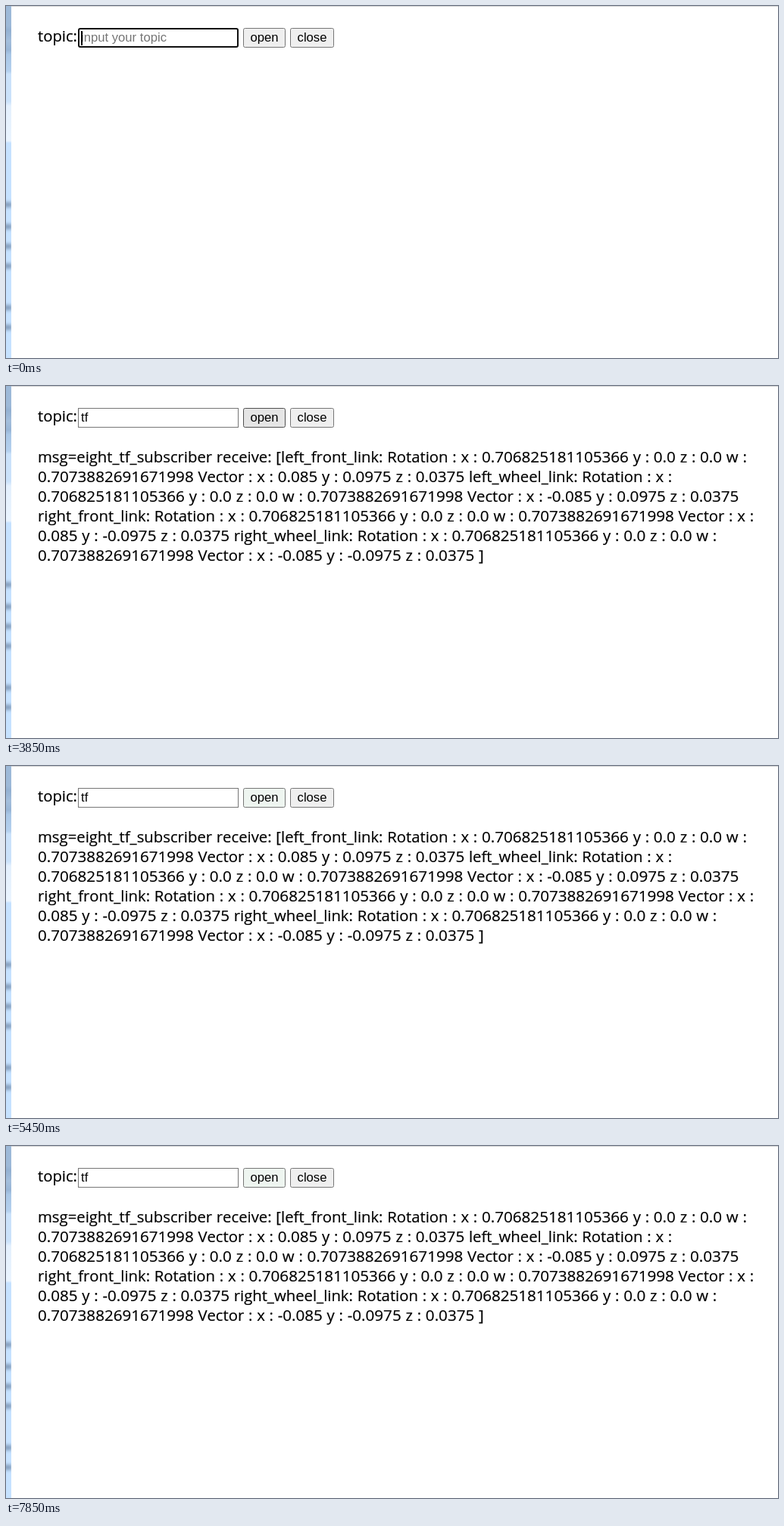
Animation, 1019 px wide and 465 px high, one loop 8 s. Source, as an HTML page:

```html
<!DOCTYPE html>
<html lang="en">
<head>
<meta charset="utf-8">
<title>Topic viewer</title>
<style>
  html, body { margin: 0; width: 100%; height: 100%; overflow: hidden; background: #fff; }
  svg { position: absolute; left: 0; top: 0; display: block; }
  .page { font: 20.3px "Open Sans", "Noto Sans", sans-serif; word-spacing: .5px; font-kerning: none;
    stroke: #000; stroke-width: .2px; }
  .number { font-size: 20.6px; }
  .control { font: 16.67px "Liberation Sans", Arial, sans-serif; }
  #strip { position: absolute; left: 0; top: 0; width: 7px; height: 465px; overflow: hidden;
    background: linear-gradient(#9db9d8 0 26px, #94b1d2 32px, #a3bedc 46px, #98b5d6 58px,
      #a9c7e6 64px, #b4d0ee 86px, #cbe2fa 90px 126px, #e4f0fd 132px, #eaf4fe 178px, #c6e2ff 181px); }
  #strip i { position: absolute; left: -4px; width: 12px; height: 7px; background: #859fbe; filter: blur(2.2px); }
</style>
</head>
<body>
<div id="strip"></div>
<svg width="1019" height="465" viewBox="0 0 1019 465">
  <rect x="7" width="1012" height="1" fill="#d6d6d6"/>
  <text class="page" x="42" y="47">topic:</text>
  <rect id="field" fill="#fff"/>
  <text id="value" class="control" x="99" y="47"></text>
  <rect id="caret" y="33" width="2" height="19"/>
  <rect id="open" x="313.5" y="29.5" width="55" height="25" rx="2"/>
  <text class="control" x="341" y="47" text-anchor="middle">open</text>
  <rect x="375.5" y="29.5" width="57" height="25" rx="2" fill="#efefef" stroke="#767676"/>
  <text class="control" x="404" y="47" text-anchor="middle">close</text>
  <g id="message" class="page"></g>
</svg>
<script>
const LOOP = 8000, MESSAGE_START = 3850, MESSAGE_STEP = 400, BLUR_AT = 3050;
const $ = id => document.getElementById(id);
const set = (el, attrs) => Object.entries(attrs).forEach(([k, v]) => el.setAttribute(k, v));
const svg = (tag, attrs) => {
  const el = document.createElementNS("http://www.w3.org/2000/svg", tag);
  set(el, attrs);
  return el;
};

const messages = [[
  "msg=eight_tf_subscriber receive: [left_front_link: Rotation : x : 0.706825181105366 y : 0.0 z : 0.0 w :",
  "0.7073882691671998 Vector : x : 0.085 y : 0.0975 z : 0.0375 left_wheel_link: Rotation : x :",
  "0.706825181105366 y : 0.0 z : 0.0 w : 0.7073882691671998 Vector : x : -0.085 y : 0.0975 z : 0.0375",
  "right_front_link: Rotation : x : 0.706825181105366 y : 0.0 z : 0.0 w : 0.7073882691671998 Vector : x :",
  "0.085 y : -0.0975 z : 0.0375 right_wheel_link: Rotation : x : 0.706825181105366 y : 0.0 z : 0.0 w :",
  "0.7073882691671998 Vector : x : -0.085 y : -0.0975 z : 0.0375 ]"
], [
  "msg=eight_tf_subscriber receive: [camera_color_frame: Rotation : x : 0.0 y : 0.0 z : 0.0 w : 1.0 Vector",
  ": x : 0.0 y : -0.0 z : -0.0 camera_color_frame: Rotation : x : 0.0 y : 0.0 z : 0.0 w : 1.0 Vector : x : 0.0 y :",
  "-0.0 z : -0.0 camera_color_optical_frame: Rotation : x : -0.5 y : 0.4999999999999999 z : -0.5 w :",
  "0.5000000000000001 Vector : x : 0.0 y : -0.0 z : -0.0 camera_depth_optical_frame: Rotation : x : -0.5",
  "y : 0.4999999999999999 z : -0.5 w : 0.5000000000000001 Vector : x : 0.0 y : -0.0 z : -0.0",
  "camera_depth_frame: Rotation : x : 0.0 y : 0.0 z : 0.0 w : 1.0 Vector : x : 0.0 y : -0.0 z : -0.0 ]"
]];

const buttonLooks = {
  idle: { fill: "#efefef", stroke: "#767676" },
  hover: { fill: "#e5e5e5", stroke: "#4f4f4f" },
  pressed: { fill: "#f5f5f5", stroke: "#8d8d8d" },
  left: { fill: "#eef5f0", stroke: "#767676" }
};
const buttonStates = [[0, "idle"], [1770, "hover"], [2080, "idle"], [2290, "hover"],
  [BLUR_AT, "pressed"], [3450, "hover"], [5450, "left"]];
const typed = [[0, ""], [830, "t"], [1030, "tf"]];
const caretStates = [[0, true], [290, false], [830, true], [1570, false], [2080, true], [2610, false]];
const caretX = [99, 103, 108];

const at = (steps, t) => steps.filter(([start]) => start <= t).pop()[1];

for (const y of [262, 291, 317, 343, 398, 424]) {
  const smudge = document.createElement("i");
  smudge.style.top = y - 3.5 + "px";
  $("strip").append(smudge);
}

// Numbers are set slightly larger than words.
function textLine(text, row) {
  const line = svg("text", { x: 42, y: 101 + 26 * row });
  for (const part of text.split(/(\d+\.\d+)/)) {
    if (!/^\d/.test(part)) { line.append(part); continue; }
    const number = svg("tspan", { class: "number" });
    number.textContent = part;
    line.append(number);
  }
  return line;
}

const groups = messages.map(rows => {
  const group = svg("g", { display: "none" });
  group.append(...rows.map(textLine));
  $("message").append(group);
  return group;
});

function draw() {
  const t = performance.now() % LOOP;
  const focused = t < BLUR_AT;
  const text = at(typed, t);
  set($("field"), focused
    ? { x: 96, y: 30, width: 210, height: 24, rx: 2, stroke: "#101010", "stroke-width": 2 }
    : { x: 95.5, y: 29.5, width: 211, height: 25, rx: 0, stroke: "#767676", "stroke-width": 1 });
  $("value").textContent = text || "input your topic";
  set($("value"), { fill: text ? "#000" : "#757575" });
  set($("caret"), { x: caretX[text.length], visibility: at(caretStates, t) ? "visible" : "hidden" });
  set($("open"), buttonLooks[at(buttonStates, t)]);
  const current = t < MESSAGE_START ? -1 : Math.floor((t - MESSAGE_START) / MESSAGE_STEP) % 2;
  groups.forEach((group, i) => set(group, { display: i === current ? "inline" : "none" }));
  requestAnimationFrame(draw);
}
draw();
</script>
</body>
</html>
```
